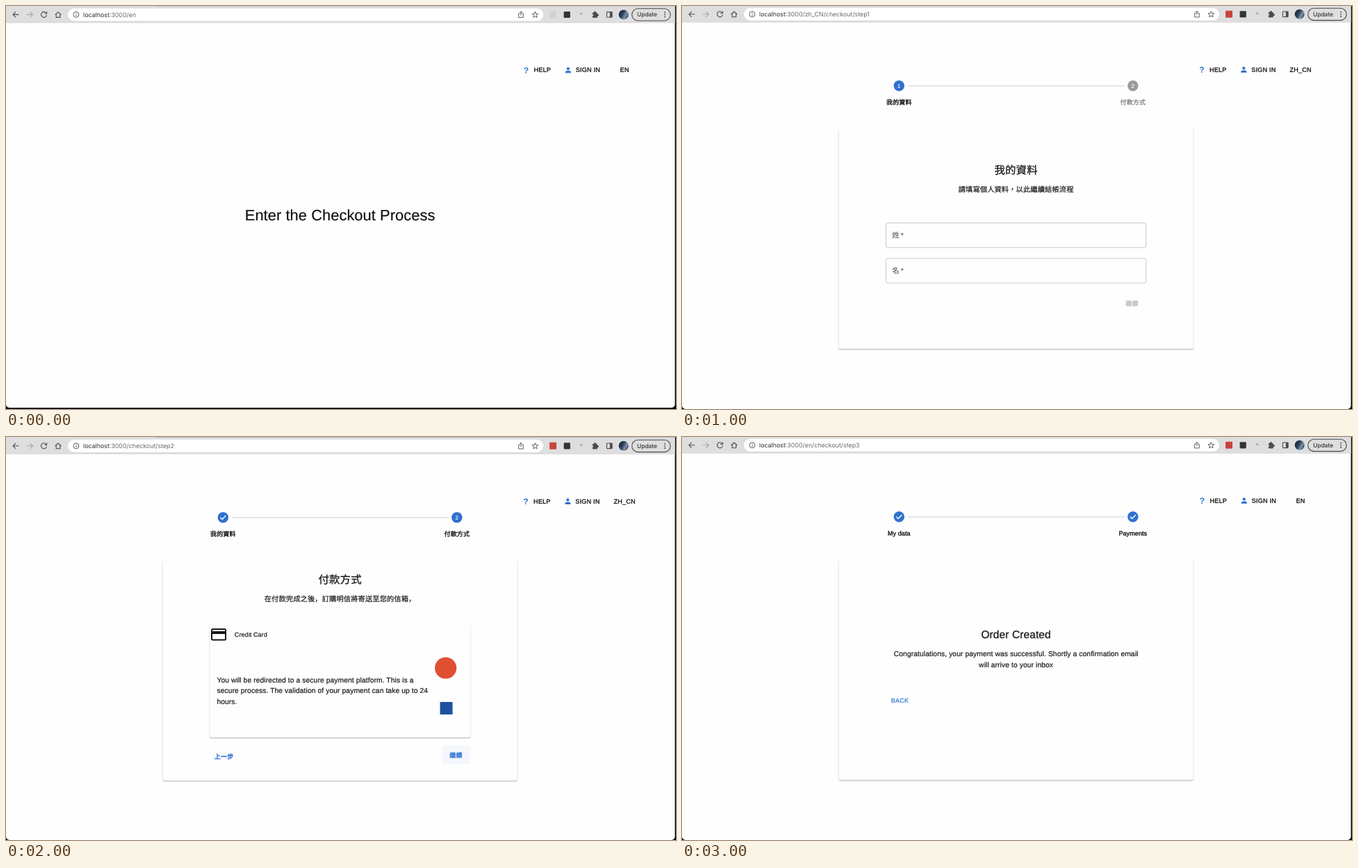
These frames come from a looping animation (964 px wide and 581 px high, 3500 ms). An HTML page with a canvas:

```html
<!DOCTYPE html>
<html lang="en">
<head>
<meta charset="utf-8">
<title>Checkout flow</title>
<style>
  html, body { margin: 0; width: 100%; height: 100%; overflow: hidden; background: #000; }
  canvas { display: block; }
</style>
</head>
<body>
<canvas id="stage" width="964" height="581"></canvas>
<script>
const ctx = document.getElementById('stage').getContext('2d');
ctx.textRendering = 'geometricPrecision';
ctx.lineJoin = 'round';
const SANS = '"Liberation Sans", "Noto Sans CJK TC", sans-serif';
const SANS_SC = '"Liberation Sans", "Noto Sans CJK SC", sans-serif';
const UI = 'Inter, sans-serif';
const INK = '#181818', GREY = '#6b6b6b', BLUE = '#2f70d0', RED = '#c9302c', DISABLED = '#bdbdbd', ICON = '#4c4c4e';
const MID = 480.6, BODY = 10.27, TITLE = 15.4;

// y is the middle of the capitals; heft thickens the strokes a little
function text(str, x, y, size = 9, { color = INK, align = 'left', spacing = .01, weight = 400, font = SANS, heft = .2 } = {}) {
  ctx.font = `${weight} ${size}px ${font}`;
  ctx.letterSpacing = spacing * size + 'px';
  ctx.textAlign = align;
  ctx.fillStyle = ctx.strokeStyle = color;
  ctx.fillText(str, x, y + size * .36);
  if (heft) {
    ctx.lineWidth = heft;
    ctx.strokeText(str, x, y + size * .36);
  }
  return ctx.measureText(str).width;
}
const centered = (str, x, y, size, options) => text(str, x, y, size, { align: 'center', ...options });
const button = (str, x, y, color, weight) => centered(str, x, y, 9, { color, weight, spacing: .0286 });

function rect(x, y, w, h, color, radius = 0) {
  ctx.fillStyle = color;
  ctx.beginPath();
  ctx.roundRect(x, y, w, h, radius);
  ctx.fill();
}
function frame(x, y, w, h, color, width, radius = 0) {
  ctx.strokeStyle = color;
  ctx.lineWidth = width;
  ctx.beginPath();
  ctx.roundRect(x, y, w, h, radius);
  ctx.stroke();
}
function dot(x, y, r, color) {
  ctx.fillStyle = color;
  ctx.beginPath();
  ctx.arc(x, y, r, 0, 7);
  ctx.fill();
}
function stroke(path, color = ICON, width = 1.1) {
  ctx.strokeStyle = color;
  ctx.lineWidth = width;
  ctx.stroke(new Path2D(path));
}

function paper(x, y, w, h) {
  ctx.save();
  ctx.shadowColor = 'rgba(0,0,0,.32)';
  ctx.shadowBlur = 1.5;
  ctx.shadowOffsetY = 1;
  rect(x, y, w, h, '#fefefe', 2.6);
  ctx.restore();
}

function toolbar({ url, pinned }, dy) {
  rect(-9, -9, 990, 32.6, '#dededf');
  rect(215, -dy, 760, dy, '#bcbcbf');
  rect(-9, 23, 990, .6, '#d0d0d1');
  rect(89, 2.8, 684, 18, '#fff', 9);

  stroke('M18.5 11.8H10M14 7.8L10 11.8L14 15.8');
  stroke('M30 11.8H38.5M34.5 7.8L38.5 11.8L34.5 15.8', '#a5a5a7');
  stroke('M57.6 9.2A4 4 0 1 0 58.5 12.6M58.6 7.4V10.4H55.4');
  stroke('M70.8 12L75 8L79.2 12M72.2 11V15.8H77.8V11');
  stroke('M105 11.8A4 4 0 1 0 97 11.8A4 4 0 1 0 105 11.8M101 11.2V14M101 9.3V10.3', ICON, .9);

  const host = 'localhost', options = { font: UI, spacing: 0, heft: 0 };
  const width = text(host, 111, 11.8, 8.86, { ...options, color: '#2b2b2d' });
  text(url, 111 + width, 11.8, 8.86, { ...options, color: '#68686b' });

  stroke('M739.4 10.4H737.6V16H744.2V10.4H742.4M740.9 13V7.5M738.9 9.3L740.9 7.3L742.9 9.3', ICON, .9);
  ctx.beginPath();
  for (let i = 0; i < 10; i++) {
    const a = i * Math.PI / 5 - Math.PI / 2, r = i % 2 ? 2 : 4.6;
    ctx.lineTo(761.3 + r * Math.cos(a), 12.2 + r * Math.sin(a));
  }
  ctx.closePath();
  ctx.lineWidth = .9;
  ctx.stroke();

  rect(782, 6.8, 10, 10, pinned ? '#c5453c' : '#d2d2d3', 1);
  rect(802.6, 7.3, 9.2, 9.2, '#333', 1);
  dot(827.5, 10.5, 1.5, '#a0a0a2');
  rect(843.8, 9, 7, 7.4, ICON, 1);
  dot(847.3, 8.6, 1.6, ICON);
  dot(851.2, 12.6, 1.6, ICON);
  dot(843.8, 12.6, 1.2, '#dededf');
  frame(864.4, 8, 7.6, 7.6, ICON, 1.1, .6);
  rect(868.8, 8, 3.4, 7.6, ICON);

  const photo = ctx.createLinearGradient(882, 8, 895, 15);
  photo.addColorStop(0, '#18263a');
  photo.addColorStop(.4, '#2c4058');
  photo.addColorStop(.75, '#7f95ab');
  photo.addColorStop(1, '#24354a');
  dot(888.6, 11.8, 7, photo);

  frame(900.6, 3.2, 55.4, 17.4, '#4a4a4c', 1.1, 8.7);
  text('Update', 908, 11.8, 8.4, { ...options, weight: 500, color: '#333' });
  for (const y of [8.6, 11.8, 15]) dot(948, y, .9, '#333');
}

function header(lang) {
  const zh = lang !== 'EN', x = zh ? -.5 : 0, y = 91.4;
  const options = { spacing: .0286, color: '#0c0c0c', heft: .3 };
  centered('?', 748.5 + x, y + .3, 12, { color: BLUE, weight: 700, heft: 0 });
  text('HELP', 759.5 + x, y, 9, options);
  dot(808.8 + x, y - 1.7, 2.1, BLUE);
  rect(804.7 + x, y + 1.3, 8.3, 3.2, BLUE, [4, 4, 0, 0]);
  text('SIGN IN', 819.7 + x, y, 9, options);
  text(lang, zh ? 874.5 : 883.6, y, 9, options);
}

function step(x, number, label, state) {
  const y = 115;
  dot(x, y, 7.7, state === 'todo' ? '#9a9a9a' : BLUE);
  if (state === 'done') stroke(`M${x - 3.9} ${y}l2.7 2.8l5.2 -5.5`, '#fff', 1.4);
  else centered(number, x, y, 7.7, { color: '#fff' });
  centered(label, x, 139.2, 9, state === 'todo' ? { color: GREY } : { heft: .4 });
}
function stepper([first, second], states) {
  step(312.3, '1', first, states[0]);
  step(648.8, '2', second, states[1]);
  rect(325, 114.7, 311.5, .8, '#bdbdbd');
}

function field(y, label) {
  frame(293.4, y, 374.4, 35.4, '#c4c4c4', .9, 2.6);
  text(label + '\u2009*', 302.3, y + 17.5, BODY, { color: GREY });
}
function openField(y, label, color, width) {
  frame(293.6, y, 374, 35.2, color, width, 2.6);
  rect(299, y - 2, 19, 4, '#fefefe');
  text(label + '\u2009*', 302.2, y, 7.7, { color: width > 1 ? color : GREY });
}
function heading(title, lines, y, font) {
  centered(title, MID, y, TITLE, { heft: .3 });
  lines.forEach((line, i) => centered(line, MID, y + 28.3 + i * 15.4, BODY, { font }));
}

function emptyForm(title, hint, first, last) {
  heading(title, [hint], 236);
  field(312.8, first);
  field(363.8, last);
}
function filledForm() {
  heading('我的資料', ['請填寫個人資料，以此繼續結帳流程'], 228.6);
  openField(305.9, '姓', '#c4c4c4', .9);
  text('orvin', 302, 323.5, BODY);
  openField(356.7, '名', RED, 1.4);
  text('Mern', 302.4, 374.4, BODY, { color: '#a8a8a8' });
  rect(302, 368.5, .9, 12.4, '#222');
  text('It cannot be empty', 302, 400.2, 7.7, { color: RED, spacing: .033 });
  button('繼續', 647.6, 436, DISABLED, 600);
}
function payment() {
  heading('付款方式', ['在付款完成之後，訂購明信將寄送至您的信箱，'], 204.2, SANS_SC);
  paper(293.2, 270, 374.8, 162.2);
  frame(296, 276, 20, 15.4, INK, 2, 1.5);
  rect(296, 279, 20, 4, INK);
  text('Credit Card', 328.8, 283.7);
  ['You will be redirected to a secure payment platform. This is a',
   'secure process. The validation of your payment can take up to 24',
   'hours.'].forEach((line, i) => text(line, 303.4, 349.3 + i * 15.4, BODY));
  dot(632.6, 332, 15.6, '#df5030');
  rect(624.5, 381, 18, 18, '#1f51a3');
  button('上一步', 313.7, 459.4, BLUE, 600);
  rect(627.8, 443.4, 40, 27.6, '#f4f7fc', 2.6);
  button('繼續', 647.6, 457.6, BLUE, 600);
}

const EN = ['My data', 'Payments'], ZH = ['我的資料', '付款方式'];
const scenes = [
  { url: ':3000/en', lang: 'EN', dy: .6, bottom: 579.3, body() {
    centered('Enter the Checkout Process', MID, 301, 21.8, { spacing: .004, color: '#111' });
  } },
  { url: ':3000/en/checkout/step1', lang: 'EN', dy: .8, zoom: 1.0022, right: 963.5, labels: EN, states: ['now', 'todo'], body() {
    emptyForm('My Data', 'Please enter your personal data and press continue', 'First Name', 'Last Name');
    button('CONTINUE', 638.6, 428.7, DISABLED);
  } },
  { url: ':3000/zh_CN/checkout/step1', lang: 'ZH_CN', pinned: true, labels: ZH, states: ['now', 'todo'], body() {
    emptyForm('我的資料', '請填寫個人資料，以此繼續結帳流程', '姓', '名');
    button('繼續', 647.6, 428.4, DISABLED, 600);
  } },
  { url: ':3000/zh_CN/checkout/step1', lang: 'ZH_CN', pinned: true, dy: .5, labels: ZH, states: ['now', 'todo'], body: filledForm },
  { url: ':3000/checkout/step2', lang: 'ZH_CN', pinned: true, dy: 1, labels: ZH, states: ['done', 'now'], body: payment },
  { url: ':3000/checkout/step3', lang: 'ZH_CN', pinned: true, labels: ZH, states: ['done', 'done'], body() {
    heading('訂單已創建', ['恭喜您，付款成功。您即將收到一封確認電子郵件'], 290.2, SANS_SC);
    rect(293.4, 361.6, 40.2, 23.4, '#f5f8fc', 2.6);
    button('BACK', 313.6, 373.2, BLUE);
  } },
  { url: ':3000/en/checkout/step3', lang: 'EN', pinned: true, labels: EN, states: ['done', 'done'], body() {
    heading('Order Created', ['Congratulations, your payment was successful. Shortly a confirmation email',
      'will arrive to your inbox'], 284.4);
    button('BACK', 313.6, 379.8, BLUE);
  } },
];

function draw(scene) {
  const { dy = 0, zoom = 1, right = 962.5, bottom = 581 } = scene;
  ctx.save();
  rect(0, 0, 964, 581, '#000');
  ctx.beginPath();
  ctx.roundRect(0, -10, right, bottom + 10, 5);
  ctx.clip();
  rect(0, 0, 964, 581, '#fefefe');
  ctx.translate(0, dy);
  ctx.scale(zoom, zoom);
  toolbar(scene, dy);
  header(scene.lang);
  if (scene.labels) {
    stepper(scene.labels, scene.states);
    paper(225.6, 177, 510.2, 317.6);
  }
  scene.body();
  ctx.restore();
}

function tick() {
  draw(scenes[Math.floor(performance.now() / 500) % scenes.length]);
  requestAnimationFrame(tick);
}
tick();
</script>
</body>
</html>
```
